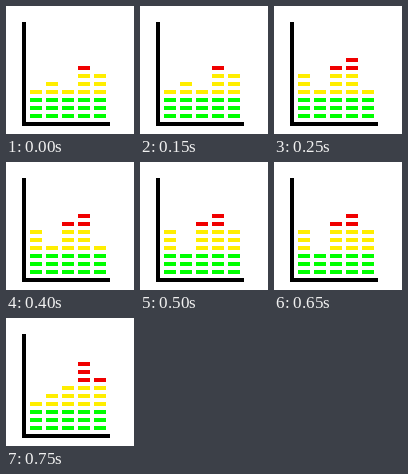
These frames come from a looping animation (128x128 px, 1000 ms). An HTML page with a canvas:

```html
<!DOCTYPE html>
<html lang="en">
<head>
<meta charset="utf-8">
<title>Level meter</title>
<style>
html, body { margin: 0; width: 100%; height: 100%; overflow: hidden; background: #fff; }
canvas { display: block; }
</style>
</head>
<body>
<canvas id="stage" width="128" height="128"></canvas>
<script>
const ctx = document.getElementById('stage').getContext('2d');
const STEP = 250;
// Lit segments per bar, one row per step
const levels = [
  [4, 5, 4, 7, 6],
  [6, 4, 7, 8, 4],
  [6, 3, 7, 8, 6],
  [4, 5, 6, 9, 7],
];
const colors = ['#00ff00', '#ffee00', '#f00000'];

function rect(color, x, y, w, h) {
  ctx.fillStyle = color;
  ctx.fillRect(x, y, w, h);
}

function draw(time) {
  rect('#fff', 0, 0, 128, 128);
  rect('#000', 16, 16, 4, 104);
  rect('#000', 16, 116, 88, 4);
  const row = levels[Math.floor(time / STEP) % levels.length];
  row.forEach((level, bar) => {
    for (let i = 0; i < level; i++) {
      rect(colors[Math.floor(i / 3)], 24 + bar * 16, 108 - i * 8, 12, 4);
    }
  });
}

const start = performance.now();
function tick() {
  draw(performance.now() - start);
  requestAnimationFrame(tick);
}
tick();
</script>
</body>
</html>
```
